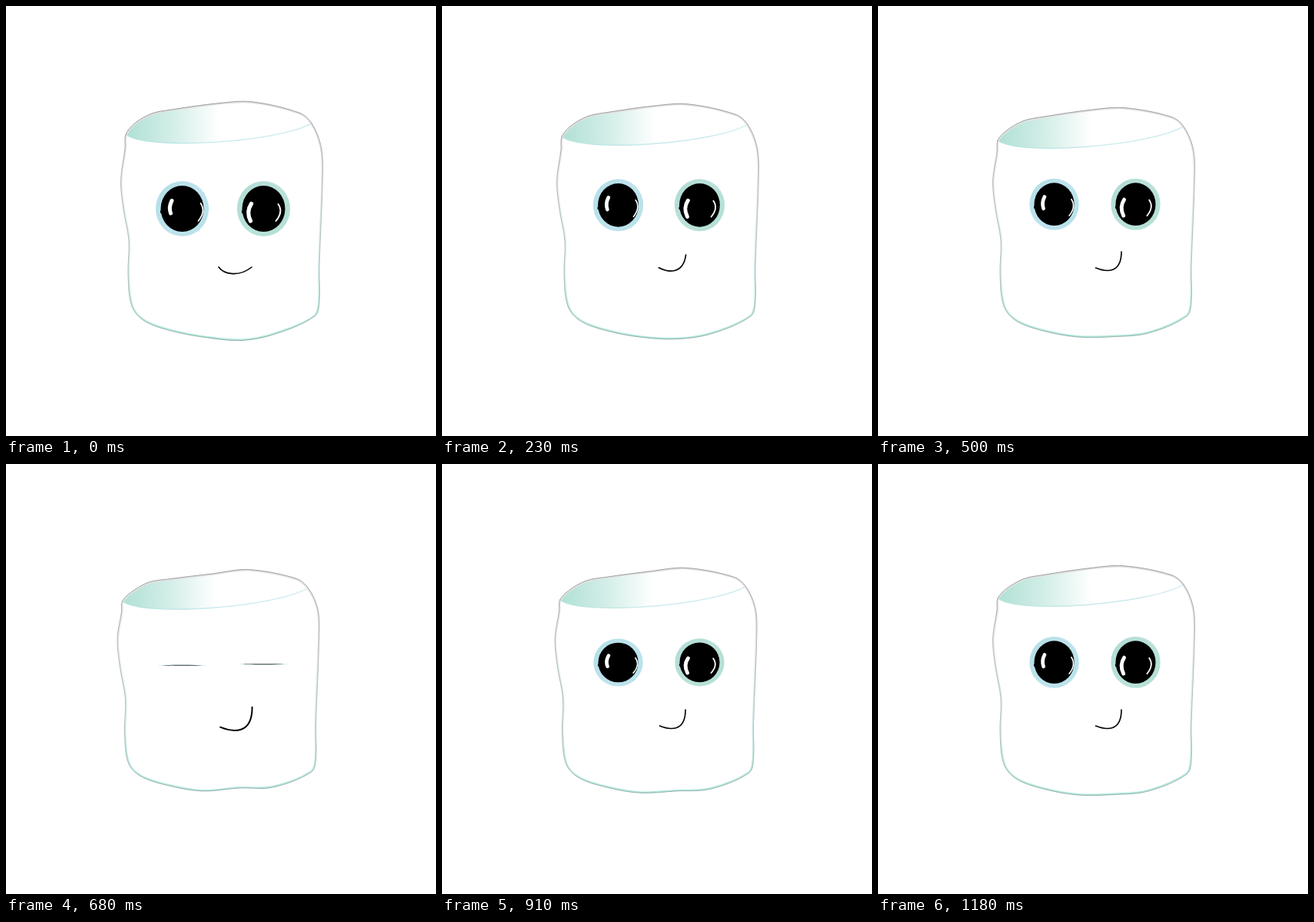
These frames come from a looping animation (560 px wide and 560 px high, 1990 ms). An HTML page with a canvas:

```html
<!DOCTYPE html>
<html lang="en">
<head>
<meta charset="utf-8">
<title>Marshmallow</title>
<style>
html, body { margin: 0; width: 100%; height: 100%; overflow: hidden; background: #fff; }
canvas { display: block; width: 560px; height: 560px; }
</style>
</head>
<body>
<canvas id="stage" width="560" height="560"></canvas>
<script>
const ctx = document.getElementById('stage').getContext('2d');
const LOOP = 1990, STEP = 1000 / 22, LAST_STEP = 26;

// Key points of the body at rest, clockwise from the left end of the rim.
const TOP = [[156, 175], [168, 162], [190, 149.5], [215, 144.5], [275, 135.7], [320, 132.7], [382, 144.5], [398, 157]];
const SIDES = [[410, 184], [412.5, 215], [408, 340], [408, 386], [402, 404], [352, 426], [308, 430.5], [260, 431],
  [215, 423], [180, 410], [164, 391], [159, 350], [160, 306], [153, 265], [149.5, 228], [155, 190]];
const BODY = [...TOP, ...SIDES];

const SMILE = [277, 340, 284, 350, 304, 353, 320, 340];
const SMIRK = [283.5, 341, 297, 346.5, 317, 349, 317, 320];

const lerp = (a, b, t) => a + (b - a) * t;
const clamp = v => Math.min(1, Math.max(0, v));
const bump = (x, center, width) => Math.exp(-(((x - center) / width) ** 2));
const ease = (k, from, to) => {
  const t = clamp((k - from) / (to - from));
  return t * t * (3 - 2 * t);
};

// Stretching lifts the top and drops the base; squashing does the opposite and leans left.
function deform([x, y], stretch, squash) {
  const top = clamp((215 - y) / 50);
  const base = clamp((y - 380) / 40);
  const across = (x - 156) / 256;
  const sag = bump(x, 306, 32);
  const drop = squash * (4.5 + 3 * bump(x, 258, 40)) - stretch * (9.5 - 6 * across ** 3);
  const sink = stretch * 5 * sag - squash * (4.5 + 4 * sag);
  return [x - 4.5 * squash, y + top * drop + base * sink];
}

// Smooth curve through the first `spans` spans of a closed point list.
function smoothPath(points, spans) {
  const at = i => points[(i + points.length) % points.length];
  const handle = (i, reach) => {
    const [[ax, ay], [x, y], [bx, by]] = [at(i - 1), at(i), at(i + 1)];
    const scale = reach / Math.hypot(bx - ax, by - ay);
    return [x + (bx - ax) * scale, y + (by - ay) * scale];
  };
  const path = new Path2D();
  path.moveTo(...at(0));
  for (let i = 0; i < spans; i++) {
    const [a, b] = [at(i), at(i + 1)];
    const reach = Math.hypot(b[0] - a[0], b[1] - a[1]) / 3;
    path.bezierCurveTo(...handle(i, reach), ...handle(i + 1, -reach), ...b);
  }
  return path;
}

function gradient(x0, y0, x1, y1, ...colors) {
  const g = ctx.createLinearGradient(x0, y0, x1, y1);
  colors.forEach((c, i) => g.addColorStop(i / (colors.length - 1), c));
  return g;
}

function stroke(path, style, width) {
  ctx.strokeStyle = style;
  ctx.lineWidth = width;
  ctx.stroke(path);
}

function drawBody(stretch, squash) {
  const points = BODY.map(p => deform(p, stretch, squash));
  const body = smoothPath(points, points.length);
  const [lx, ly] = points[0];
  const [rx, ry] = points[TOP.length - 1];
  const lip = [rx - 44, ry + 25.5, lx + 28, ly + 21, lx, ly];

  const opening = smoothPath(points, TOP.length - 1);
  opening.bezierCurveTo(...lip);
  ctx.fillStyle = gradient(lx, 0, lx + 122, 0, '#b0e0d4', '#d3eee8', '#ffffff');
  ctx.fill(opening);

  const rim = new Path2D();
  rim.moveTo(rx, ry);
  rim.bezierCurveTo(...lip);
  stroke(rim, gradient(lx, 0, rx, 0, '#b5e4dc', '#c9eaec', '#cdeaf0'), 1.4);

  ctx.save();
  ctx.clip(body);
  stroke(body, gradient(0, 130, 0, 432, '#e2e0e2', '#e6e9ea', '#dceff0', '#b4e8dd'), 4);
  ctx.restore();
  stroke(body, gradient(0, 130, 0, 432, '#868686', '#a0a4a4', '#9cabab', '#7f9f99'), 0.8);
}

function disc(x, y, rx, ry, fill) {
  ctx.beginPath();
  ctx.ellipse(x, y, rx, ry, 0, 0, Math.PI * 2);
  ctx.fillStyle = fill;
  ctx.fill();
}

function drawEye(x, y, size, open, ringColors, glints) {
  ctx.save();
  ctx.translate(x, y);
  ctx.scale(size, size * open);
  disc(0, 0, 34.6, 36, gradient(-34, -20, 34, 20, ...ringColors));
  disc(0, 0, 28, 30, '#000');
  disc(-26.6, 4, 2.1, 2.4, '#000');
  for (const [d, width] of glints) stroke(new Path2D(d), '#fff', width);
  ctx.restore();
}

function drawMouth(curve, scale) {
  ctx.save();
  ctx.translate(302, 334);
  ctx.scale(scale, scale);
  ctx.translate(-302, -334);
  const path = new Path2D();
  path.moveTo(curve[0], curve[1]);
  path.bezierCurveTo(...curve.slice(2));
  stroke(path, '#000', 1.6);
  ctx.restore();
}

function draw(k) {
  const stretch = 1 - ease(k, 0, 12);
  const smirk = ease(k, 0, 7);
  const squash = ease(k, 12, 15) - ease(k, 16, 24.5);
  const shut = ease(k, 12, 15) - ease(k, 15, 21);

  ctx.fillStyle = '#fff';
  ctx.fillRect(0, 0, 560, 560);
  ctx.lineCap = ctx.lineJoin = 'round';

  drawBody(stretch, squash);

  const size = lerp(1, 0.93, smirk);
  const open = lerp(1, 0.014, shut);
  const eyeY = lerp(264, 258.2, smirk);
  drawEye(229.5, eyeY + 4 * shut, size, open, ['#b4dfe6', '#bfe3ee', '#b9e2ea'],
    [['M-13.5 -10.5 Q-18 -2 -15 6', 5], ['M24 -7 Q31 3 21 16', 1.7]]);
  drawEye(335.5, eyeY + 2.6 * shut, size, open, ['#b2dcd6', '#bbe2da', '#b3dfd4'],
    [['M-16 -6.5 Q-23 4 -17 16', 5.2], ['M19 -6 Q26 4 16 16', 1.9]]);

  const mouth = SMILE.map((v, i) => lerp(v, SMIRK[i], smirk));
  drawMouth(mouth, 1 + 0.24 * shut ** 1.6);
}

function tick() {
  const time = Math.floor(performance.now() % LOOP / 10) * 10;
  draw(Math.min(LAST_STEP, Math.floor((time + 5) / STEP)));
  requestAnimationFrame(tick);
}
tick();
</script>
</body>
</html>
```
